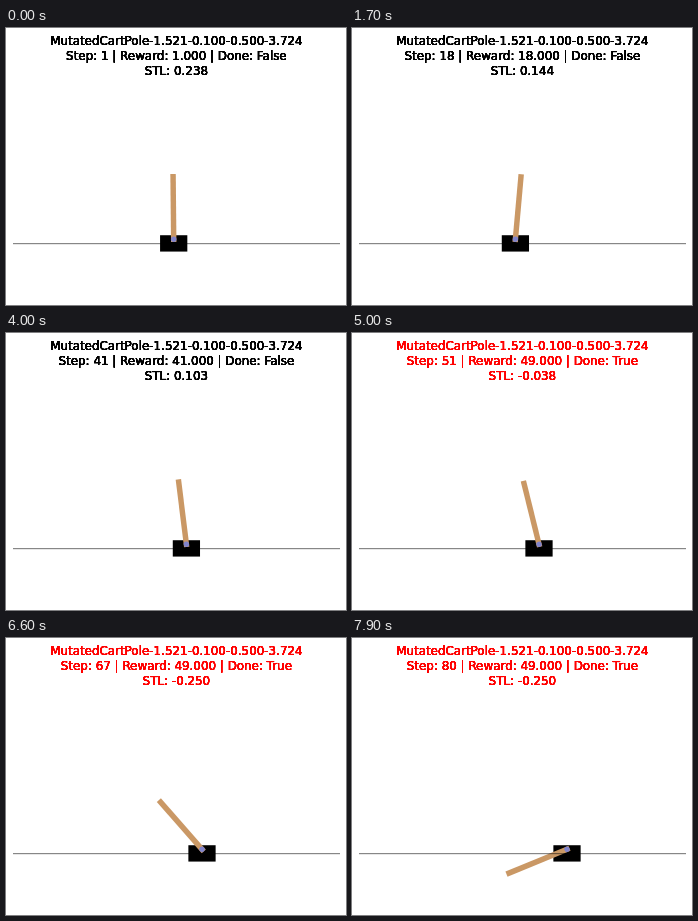
Recreate the animation shown at these times as an HTML page with a canvas. Size 340x277 px, loop 8 s.

```html
<!DOCTYPE html>
<html>
<head>
<meta charset="utf-8">
<title>Cart pole</title>
<style>
html, body { margin: 0; width: 100%; height: 100%; overflow: hidden; background: #fff; }
canvas { display: block; }
</style>
</head>
<body>
<canvas id="stage" width="340" height="277"></canvas>
<script>
const ctx = document.getElementById('stage').getContext('2d');
const STEPS = 80, STEP_MS = 100, DONE_STEP = 49;
const SCALE = 0.545, CENTER = 170.4, TRACK_Y = 215.4;
const MAX_ANGLE = 12 * Math.PI / 180;
const TEXT_PASSES = 8;

// Key poses: step, cart x, pole angle
const POSES = [
  [1, 167.7, -0.01], [18, 163.4, 0.0888], [20, 163.75, 0.0906], [28, 167.2, 0.057],
  [41, 180.4, -0.1232], [51, 187, -0.2413], [67, 196, -0.72], [80, 215, -1.96]
];

const span = i => POSES[i + 1][0] - POSES[i][0];
const slope = (i, k) => (POSES[i + 1][k] - POSES[i][k]) / span(i);

// Starts at rest, then follows the parabola through neighbouring poses
function speed(i, k) {
  if (i === 0) return 0;
  if (i === POSES.length - 1) return 2 * slope(i - 1, k) - speed(i - 1, k);
  const before = span(i - 1), after = span(i);
  return (slope(i - 1, k) * after + slope(i, k) * before) / (before + after);
}

function poseAt(step) {
  const j = POSES.findIndex((p, n) => n && step <= p[0]), i = j - 1;
  const h = span(i), u = (step - POSES[i][0]) / h, w = 1 - u;
  const mix = k =>
    w * w * ((1 + 2 * u) * POSES[i][k] + u * h * speed(i, k)) +
    u * u * ((3 - 2 * u) * POSES[j][k] - w * h * speed(j, k));
  return { x: mix(1), angle: mix(2) };
}

// Robustness is the worst margin so far
function robustness(step) {
  let worst = 0.25;
  for (let s = 1; s <= step; s++) {
    worst = Math.min(worst, 0.25 * (1 - Math.abs(poseAt(s).angle) / MAX_ANGLE));
  }
  return Math.max(worst, -0.25);
}

function drawTitle(step) {
  const done = step >= DONE_STEP;
  const lines = [
    'MutatedCartPole-1.521-0.100-0.500-3.724',
    `Step: ${step} | Reward: ${Math.min(step, DONE_STEP).toFixed(3)} | Done: ${done ? 'True' : 'False'}`,
    `STL: ${robustness(step).toFixed(3)}`
  ];
  ctx.font = '11.9px "DejaVu Sans", sans-serif';
  ctx.textAlign = 'center';
  ctx.fillStyle = done ? '#f00' : '#000';
  // Repeated passes give the heavy edges
  for (let pass = 0; pass < TEXT_PASSES; pass++) {
    lines.forEach((line, i) => ctx.fillText(line, CENTER, 17 + 15 * i));
  }
}

function drawCart({ x, angle }) {
  ctx.save();
  ctx.translate(x, TRACK_Y);
  ctx.scale(SCALE, SCALE);
  ctx.fillStyle = '#000';
  ctx.fillRect(-25, -15, 50, 30);
  ctx.translate(0, -7.5);
  ctx.rotate(angle);
  ctx.fillStyle = 'rgb(202,152,101)';
  ctx.fillRect(-5, -120, 10, 125);
  ctx.fillStyle = 'rgb(129,132,203)';
  ctx.beginPath();
  ctx.arc(0, 0, 5, 0, 2 * Math.PI);
  ctx.fill();
  ctx.restore();
}

function draw(now) {
  const step = Math.floor(now / STEP_MS) % STEPS + 1;
  ctx.fillStyle = '#fff';
  ctx.fillRect(0, 0, 340, 277);
  drawCart(poseAt(step));
  ctx.fillStyle = 'rgba(0,0,0,0.47)';
  ctx.fillRect(7, 215, 327, 1.2);
  drawTitle(step);
}

function tick() {
  draw(performance.now());
  requestAnimationFrame(tick);
}
tick();
</script>
</body>
</html>
```
